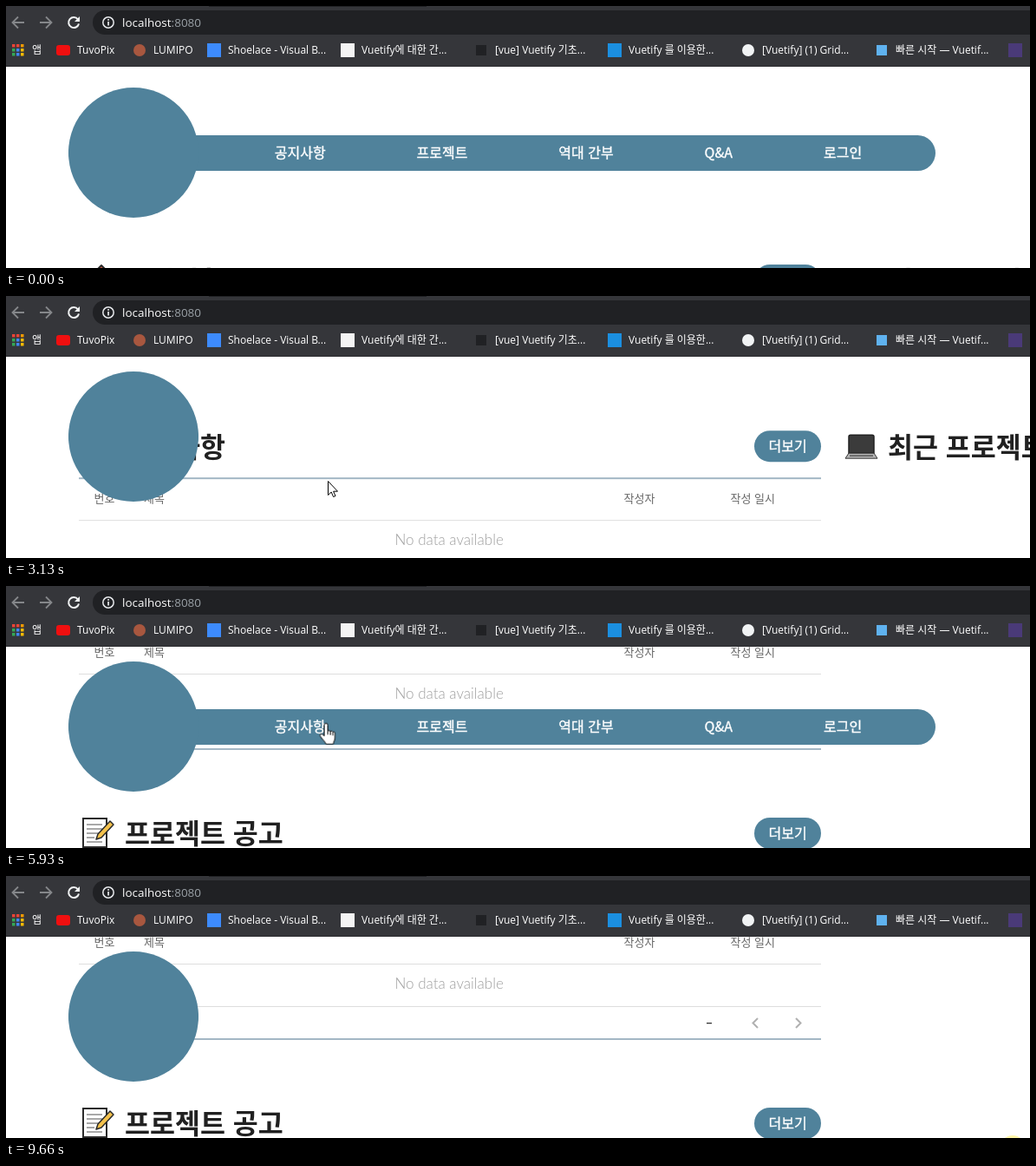
Animation of 1181 by 302 pixels, one loop 9.74 s. Source, as an HTML page:

```html
<!DOCTYPE html>
<html lang="ko">
<head>
<meta charset="utf-8">
<title>localhost:8080</title>
<style>
  :root { --main: #50829b; --loop: 9740ms; --kr: "Noto Sans CJK KR", "Noto Sans CJK", sans-serif; }
  html, body { margin: 0; width: 100%; height: 100%; overflow: hidden; background: #fff; }
  #stage { position: absolute; left: 0; top: 0; width: 1181px; height: 302px; overflow: hidden; background: #fff; font-family: var(--kr); }
  #stage > * { position: absolute; left: 0; top: 0; }
  svg { display: block; overflow: visible; }

  /* scrolling page */
  #page { animation: scroll var(--loop) ease-in-out infinite; }
  .h { font-size: 31.5px; font-weight: 700; fill: #212121; }
  .th { font-size: 13px; fill: #666; }
  .btn { fill: var(--main); }
  .more { font-size: 16px; font-weight: 500; fill: #fff; stroke: #fff; stroke-width: .35px; }
  .none { font: 300 17px Lato, sans-serif; fill: #9e9e9e; }
  .rule { fill: #a3b7c5; }
  .thin { fill: #dedede; }

  /* sticky header */
  #head { animation: stick var(--loop) linear infinite; }
  #nav { position: absolute; left: 72px; top: 149px; width: 1000px; height: 41px; border-radius: 21px; overflow: hidden;
    background: var(--main); animation: nav var(--loop) ease infinite; }
  #nav ul { position: absolute; left: 133px; right: -20px; top: -1px; margin: 0; padding: 0; list-style: none; display: flex;
    justify-content: space-evenly; animation: items var(--loop) ease infinite; }
  #nav li { flex: none; white-space: nowrap; color: #fff; font-size: 16px; font-weight: 500; line-height: 40px; -webkit-text-stroke: .35px #fff; }
  #logo { position: absolute; left: 72px; top: 94px; width: 150px; height: 150px; border-radius: 50%; background: var(--main); }

  #stage > #menu { left: 452px; top: 183px; width: 98px; height: 97px; border-radius: 0 0 4px 4px; background: #fff; color: #555;
    box-shadow: 0 5px 5px -3px #0003, 0 8px 10px 1px #0002, 0 3px 14px 2px #0002;
    font-size: 16px; font-weight: 300; line-height: 48px; text-align: center;
    transform-origin: 0 0; animation: menu var(--loop) ease-out infinite; }
  #menu div { position: relative; top: -1px; }

  /* browser bars */
  #bars text { font: 12px "Open Sans", "Noto Sans CJK KR", sans-serif; fill: #fff; }
  #bars .url { font-size: 13.5px; }

  #cur { animation: move var(--loop) ease-in-out infinite, show var(--loop) step-end infinite; }
  #arrow { animation: arrow var(--loop) step-end infinite; }
  #hand { animation: hand var(--loop) step-end infinite; }
  #cur path { fill: #fff; stroke: #000; stroke-linejoin: round; }
  #glow { animation: glow var(--loop) step-end infinite; }

  @keyframes scroll {
    0%, 22.95% { transform: translateY(0); }
    24.8%, 31% { transform: translateY(-100px); }
    33.5%, 38.09% { transform: translateY(-200px); }
    40.25%, 100% { transform: translateY(-300px); }
  }
  @keyframes stick {
    0%, 22.95% { transform: translateY(0); }
    23.5%, 100% { transform: translateY(-7px); }
  }
  @keyframes nav {
    0%, 23.08% { width: 1000px; }
    28.2%, 45.86% { width: 150px; }
    51%, 86.76% { width: 1000px; }
    91.89%, 100% { width: 150px; }
  }
  @keyframes items {
    0%, 23.08% { left: 133px; }
    28.2%, 45.85% { left: 16.5px; }
    45.86%, 86.76% { left: 133px; }
    91.89%, 100% { left: 16.5px; }
  }
  @keyframes menu {
    0%, 64.68% { opacity: 0; transform: scale(.8); }
    66.74%, 86.24% { opacity: 1; transform: none; }
    87.89%, 100% { opacity: 0; transform: none; }
  }
  @keyframes move {
    0%, 2.1% { transform: translate(1150px, 260px); }
    7.9%, 8.9% { transform: translate(1130px, 155px); }
    15.2% { transform: translate(290px, 184px); }
    16.7%, 18.5% { transform: translate(199px, 174px); }
    21.56%, 36.13% { transform: translate(371px, 213px); }
    36.14%, 40.55% { transform: translate(369px, 213px); }
    45.69%, 49.18% { transform: translate(190px, 174px); }
    56.16%, 57.29% { transform: translate(320px, 158px); }
    67.35%, 67.76% { transform: translate(509px, 157px); }
    69.71%, 71.46% { transform: translate(477px, 212px); }
    75.05%, 85.01% { transform: translate(487px, 256px); }
    95.28%, 100% { transform: translate(1152px, 290px); }
  }
  @keyframes show { 0% { opacity: 0; } 2.15% { opacity: 1; } 98.56%, 100% { opacity: 0; } }
  @keyframes hand {
    0% { opacity: 0; } 15.4% { opacity: 1; } 20.02% { opacity: 0; }
    36.14% { opacity: 1; } 81.62%, 100% { opacity: 0; }
  }
  @keyframes arrow {
    0% { opacity: 1; } 15.4% { opacity: 0; } 20.02% { opacity: 1; }
    36.14% { opacity: 0; } 81.62%, 100% { opacity: 1; }
  }
  @keyframes glow { 0% { opacity: 0; } 98.56%, 100% { opacity: 1; } }
</style>
</head>
<body>
<div id="stage">
  <svg id="page" width="1181" height="640">
    <!-- pushpin -->
    <g stroke="#2b2b2b" stroke-width="2" stroke-linejoin="round">
      <path d="M101 320L88 334" stroke-width="4" stroke-linecap="round"/>
      <path d="M101 320L89 333" stroke="#ddd" stroke-width="1.5"/>
      <path d="M110 299L124 313L119 318L114 317L108 330L92 314L105 309L105 304Z" fill="#c9573c"/>
    </g>
    <text class="h" x="137" y="328.5">공지사항</text>
    <rect class="btn" x="863" y="298" width="77" height="36" rx="18"/>
    <text class="more" x="879.5" y="322">더보기</text>

    <!-- laptop -->
    <path d="M974 303h25q2 0 2 2v19h-29v-19q0-2 2-2z" fill="#3b3b3b" stroke="#222" stroke-width="1.5"/>
    <path d="M972 324h29l4 6h-37z" fill="#b4b4b4" stroke="#333"/>
    <path d="M973 327h27" stroke="#555" stroke-width="1.5"/>
    <text class="h" x="1017" y="328.5">최근 프로젝트</text>

    <rect class="rule" x="84" y="352" width="856" height="2"/>
    <g class="th">
      <text x="101.5" y="381">번호</text>
      <text x="159" y="381">제목</text>
      <text x="712.5" y="381">작성자</text>
      <text x="835.5" y="381">작성 일시</text>
    </g>
    <rect class="thin" x="84" y="401" width="856" height="1"/>
    <text class="none" x="448.5" y="430">No data available</text>
    <rect class="thin" x="84" y="450" width="856" height="1"/>
    <rect x="808" y="469" width="6" height="1.3" fill="#333"/>
    <path d="M867 464l-5.5 5.5 5.5 5.5M911 464l5.5 5.5-5.5 5.5" fill="none" stroke="#b0b0b0" stroke-width="2"/>
    <rect class="rule" x="84" y="487" width="856" height="2"/>

    <!-- memo -->
    <path d="M89 568h27v33h-27z" fill="#fff" stroke="#2b2b2b" stroke-width="2"/>
    <path d="M93 575h18M93 580h18M93 585h14M93 590h9M93 595h18" stroke="#8a8a8a" stroke-width="1.5"/>
    <path d="M104 592l2-6 14-15 4 4-14 15z" fill="#f3c14b" stroke="#2b2b2b" stroke-width="1.5" stroke-linejoin="round"/>
    <text class="h" x="137" y="596.5">프로젝트 공고</text>
    <rect class="btn" x="863" y="567" width="77" height="36" rx="18"/>
    <text class="more" x="879.5" y="591">더보기</text>
  </svg>

  <div id="head">
    <div id="nav"><ul><li>공지사항</li><li>프로젝트</li><li>역대 간부</li><li>Q&amp;A</li><li>로그인</li></ul></div>
    <div id="logo"></div>
  </div>

  <div id="menu"><div>목록</div><div>공고</div></div>

  <svg id="bars" width="1181" height="70">
    <rect width="1181" height="70" fill="#35363a"/>
    <rect x="234" width="251" height="1" fill="#202124"/>
    <rect y="69" width="1181" height="1" fill="#2a2b2e"/>
    <rect x="100" y="5" width="1110" height="28" rx="14" fill="#202124"/>
    <g fill="none" stroke="#85878a" stroke-width="1.8">
      <path d="M21 19H8M14 12.5L7.5 19l6.5 6.5"/>
      <path d="M39 19h13M46 12.5l6.5 6.5-6.5 6.5"/>
      <path d="M83 15.5a6 6 0 1 0 1 5" stroke="#f1f3f4" stroke-width="2"/>
      <circle cx="118" cy="19" r="6.2" stroke="#e8eaed" stroke-width="1.5"/>
    </g>
    <path d="M85 12v6h-6z" fill="#f1f3f4"/>
    <path d="M117.2 15h1.7v1.7h-1.7zM117.2 18h1.7v4.5h-1.7z" fill="#e8eaed"/>
    <text class="url" x="134" y="24">localhost<tspan fill="#9aa0a6">:8080</tspan></text>

    <g id="apps"></g>
    <rect x="58" y="45" width="16" height="12" rx="3" fill="#f00f0f"/>
    <circle cx="154" cy="51" r="7" fill="#a8573f"/>
    <rect x="232" y="43" width="16" height="16" fill="#3d8bfd"/>
    <rect x="386" y="43" width="16" height="16" fill="#f4f4f4"/>
    <rect x="542" y="45" width="12" height="12" fill="#202124"/>
    <rect x="694" y="43" width="16" height="16" fill="#1b8fe0"/>
    <circle cx="856" cy="51" r="7" fill="#f1f3f4"/>
    <rect x="1004" y="45" width="12" height="12" fill="#5fb2ef"/>
    <rect x="1156" y="43" width="16" height="16" fill="#4a3a78"/>

    <text x="30" y="55">앱</text>
    <text x="82" y="55">TuvoPix</text>
    <text x="170" y="55">LUMIPO</text>
    <text x="256" y="55">Shoelace - Visual B...</text>
    <text x="410" y="55">Vuetify에 대한 간...</text>
    <text x="564" y="55">[vue] Vuetify 기초...</text>
    <text x="718" y="55">Vuetify 를 이용한...</text>
    <text x="872" y="55">[Vuetify] (1) Grid...</text>
    <text x="1026" y="55">빠른 시작 — Vuetif...</text>
  </svg>

  <svg id="glow" width="1181" height="302"><circle cx="1161" cy="313" r="14" fill="#fff7a8"/></svg>

  <svg id="cur" width="1" height="1">
    <path id="arrow" d="M.5.5V16.5L4.2 13 6.6 18.5 9 17.5 6.6 12.2H11.5Z"/>
    <g id="hand" transform="translate(-9 0)">
      <path d="M5.5 15V2.5a2 2 0 0 1 4 0V9.5a1.8 1.8 0 0 1 3 .4 1.8 1.8 0 0 1 2.8.7 1.6 1.6 0 0 1 2.6 1.4V17c0 3-1.5 4-2 7.5H7.5C7 22 3 19 1 15.5-.2 13.4 2 12 3.5 13.3Z"/>
      <path d="M9.5 9.5v4M12.5 10v4M15.3 11v3.5"/>
    </g>
  </svg>
</div>
<script>
  // 3 x 3 grid of the apps shortcut
  const colors = ['#ea4335', '#ea4335', '#f29900', '#34a853', '#4285f4', '#fbbc04', '#34a853', '#4285f4', '#fbbc04'];
  document.getElementById('apps').innerHTML = colors.map((c, i) =>
    `<rect x="${7 + i % 3 * 5}" y="${44 + Math.floor(i / 3) * 5}" width="3.5" height="3.5" fill="${c}"/>`).join('');
</script>
</body>
</html>
```
